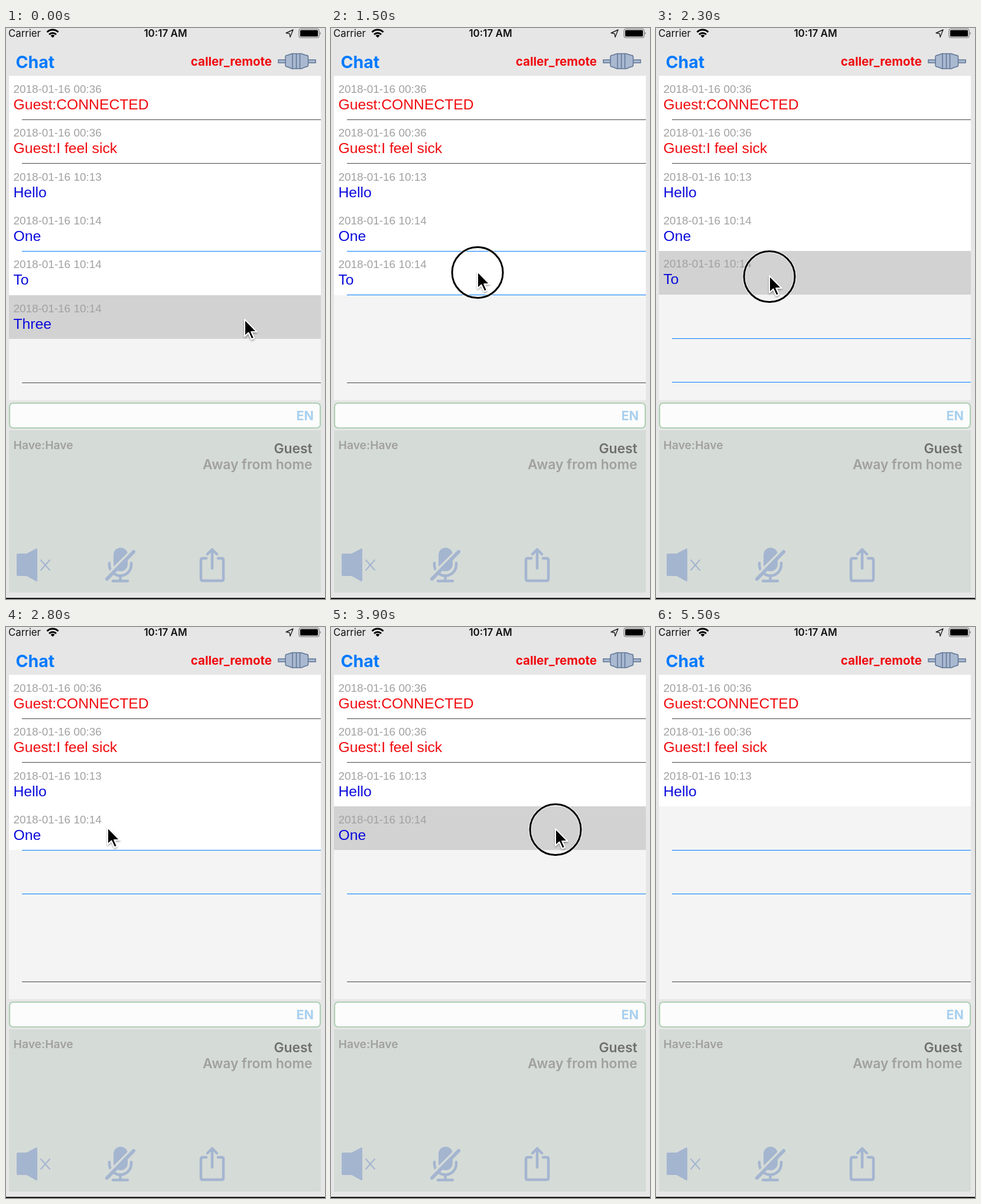
An HTML page for the animation above (5.6 s loop, 540x968 px).

```html
<!DOCTYPE html>
<html lang="en">
<head>
<meta charset="utf-8">
<title>Chat</title>
<style>
html, body { margin: 0; width: 100%; height: 100%; overflow: hidden; background: #e6e6e6; }
svg { display: block; width: 100%; height: 100%; }
text { font-family: Inter, Roboto, sans-serif; }
.date, .msg { font-family: "Liberation Sans", Arial, sans-serif; }
.date { font-size: 18.9px; fill: #a1a1a1; }
.msg { font-size: 24.7px; }
.b { font-weight: 700; }
.sb { font-weight: 600; }
.end { text-anchor: end; }
.icon { fill: #a4b5d0; }
.draw { fill: none; stroke: #a4b5d0; stroke-linecap: round; stroke-linejoin: round; }
</style>
</head>
<body>
<svg viewBox="0 0 540 968" preserveAspectRatio="none">
  <defs>
    <clipPath id="listClip"><rect x="5" y="81" width="528" height="550"/></clipPath>
    <filter id="soft" x="-50%" y="-50%" width="200%" height="200%">
      <feDropShadow dx="0" dy="2" stdDeviation="1.5" flood-opacity=".35"/>
    </filter>
  </defs>
  <rect width="540" height="968" fill="#e6e6e6"/>
  <rect y="966" width="540" height="2" fill="#151515"/>

  <!-- status bar -->
  <text x="4" y="15" font-size="16.8" fill="#111">Carrier</text>
  <g fill="none" stroke="#000" stroke-width="3">
    <path d="M69.5 7A13.5 13.5 0 0 1 88.500 7M73 11A8.600 8.600 0 0 1 85 11"/>
    <path d="M79 16.500L75.500 13A5 5 0 0 1 82.500 13Z" fill="#000" stroke="none"/>
  </g>
  <text class="sb" x="270" y="15" font-size="17" text-anchor="middle" fill="#111">10:17 AM</text>
  <path d="M486 3L474 8.500L480 9.500L481 15.500Z" fill="none" stroke="#222" stroke-width="1.4" stroke-linejoin="round"/>
  <rect x="496" y="1.500" width="34" height="15" rx="3.500" fill="none" stroke="#777" stroke-width="1.200"/>
  <rect x="498" y="3.500" width="30" height="11" rx="1.500"/>
  <path d="M531.500 6.500Q534 9 531.500 11.500Z" fill="#666"/>

  <!-- header -->
  <text class="b" x="16.500" y="68" font-size="28.500" fill="#007aff">Chat</text>
  <text class="b end" x="450" y="64" font-size="20.500" fill="#f00a0e">caller_remote</text>
  <g fill="#a9b9d0" stroke="#5f7595" stroke-width="1.500">
    <path d="M461 54H474V59H461ZM511 54H524V59H511Z"/>
    <path d="M473 49Q473 46 477 46L484 43.500H500L507 46Q511.500 46 511.500 49V63Q511.500 66 507 66L500 69H484L477 66Q473 66 473 63Z"/>
    <path d="M485 43.500V69M491.500 43.500V69M497.500 43.500V69" fill="none"/>
  </g>

  <g clip-path="url(#listClip)">
    <rect x="5" y="81" width="528" height="550" fill="#f4f4f4"/>
    <g id="rows"></g>
    <g id="lines"></g>
  </g>

  <!-- input and panel -->
  <rect x="6" y="636" width="526" height="42" rx="6" fill="#fcfcfc" stroke="#aed0b5" stroke-width="2.200"/>
  <text class="b end" x="521" y="665" font-size="21.500" fill="#a8d0ef">EN</text>
  <rect x="5" y="682" width="528" height="275" fill="#d5dbd7"/>
  <text class="sb" x="12.500" y="714" font-size="19.300" fill="#a0a0a0">Have:Have</text>
  <text class="sb end" x="518.500" y="720.500" font-size="22.800" fill="#6f6f6f">Guest</text>
  <text class="sb end" x="518.500" y="748" font-size="22.800" fill="#a0a0a0">Away from home</text>

  <path class="icon" d="M20 891H35L51 882.500Q53 881.500 53 884V936Q53 939 51 938L35 929H20Q18 929 18 927V893Q18 891 20 891Z"/>
  <path class="draw" d="M59 902L74 919M74 902L59 919" stroke-width="2"/>
  <rect class="icon" x="182" y="881" width="24" height="40" rx="12"/>
  <path class="draw" d="M175 907V910A18.500 18.500 0 0 0 212 910V907M193.500 929V937M181 937.500H206" stroke-width="4.500"/>
  <path d="M167 932L215 884" stroke="#d5dbd7" stroke-width="5"/>
  <path class="draw" d="M171 934L216 888" stroke-width="6"/>
  <path class="draw" d="M339 899H333Q330 899 330 902V934Q330 937 333 937H365Q368 937 368 934V902Q368 899 365 899H359M349 916V885M341 892L349 884L357 892" stroke-width="4.500"/>

  <g id="pointer">
    <g id="ring" fill="none">
      <circle cy="1.500" r="43" stroke="#fff" stroke-width="5" stroke-opacity=".75"/>
      <circle cy="1.500" r="43" stroke="#000" stroke-width="3"/>
    </g>
    <path d="M0 0V28.500L6.500 22.500L11.500 33.500L16 31.500L11.200 21H20.500Z" stroke="#fff" stroke-width="2" stroke-linejoin="round" filter="url(#soft)"/>
  </g>
</svg>
<script>
const LOOP = 5600, STEP = 100, ROW = 74.33, COLLAPSE = 300;
const DARK = '#464646', BLUE = '#007aff', RED = '#f00a0e', INK = '#0a0adc';
const $ = id => document.getElementById(id);

const messages = [
  ['00:36', 'Guest:CONNECTED', RED], ['00:36', 'Guest:I feel sick', RED],
  ['10:13', 'Hello', INK], ['10:14', 'One', INK], ['10:14', 'To', INK], ['10:14', 'Three', INK]
];
// row index, time it is picked, time its removal starts
const removals = [[5, 0, 513], [4, 1600, 2278], [3, 3850, 4380]];
const presses = [[100, 700], [1400, 1650], [2100, 2600], [3700, 4650]];
// time, x, y of the pointer tip
const path = [
  [0, 404, 494], [300, 400, 492], [500, 180, 489], [600, 6, 488], [700, 4, 486],
  [1300, 248, 413], [1700, 248, 413], [2100, 340, 423], [2300, 192, 420], [2450, 30, 414],
  [2550, 26, 410], [2800, 172, 340], [3000, 190, 340], [3600, 380, 342], [4200, 380, 342],
  [4450, 150, 340], [4600, 90, 338], [5000, 230, 310], [5400, 230, 310]
];
const POINTER_END = 5400;

function add(parent, tag, attrs, text) {
  const el = document.createElementNS('http://www.w3.org/2000/svg', tag);
  for (const k in attrs) el.setAttribute(k, attrs[k]);
  if (text) el.textContent = text;
  return parent.appendChild(el);
}

// Lower rows come first, so a collapsing row slides under the one above.
const rows = messages.map((m, i) => [m, i]).reverse().map(([[time, text, color], i]) => {
  const g = add($('rows'), 'g', {});
  const top = Math.round(81 + ROW * i), bottom = Math.round(81 + ROW * (i + 1));
  const y = Math.round(110 + ROW * i);
  const back = add(g, 'rect', { x: 5, y: top, width: 528, height: bottom - top });
  add(g, 'text', { class: 'date', x: 12.5, y }, '2018-01-16 ' + time);
  add(g, 'text', { class: 'msg', x: 12.5, y: y + 28, fill: color }, text);
  return { g, back };
}).reverse();

const lines = Array.from({ length: 8 }, (_, k) => ({
  el: add($('lines'), 'rect', { x: 27, width: 506, height: 1 }),
  y: Math.floor(155.4 + ROW * k)
}));

const show = (el, on) => el.setAttribute('display', on ? 'inline' : 'none');
const smooth = u => u * u * (3 - 2 * u);

function pointerAt(t) {
  const i = Math.max(1, path.findIndex(p => p[0] >= t));
  const [t0, x0, y0] = path[i - 1], [t1, x1, y1] = path[i];
  const u = (t - t0) / (t1 - t0);
  return [x0 + (x1 - x0) * u, y0 + (y1 - y0) * u];
}

function listAt(t) {
  let count = messages.length, picked = -1, shift = 0;
  for (const [row, pick, start] of removals) {
    if (t >= start + COLLAPSE) count = row;
    else if (t >= pick) {
      picked = row;
      shift = ROW * smooth(Math.max(0, t - start) / COLLAPSE);
    }
  }
  return { count, picked, shift: Math.round(shift) };
}

function render(t) {
  const { count, picked, shift } = listAt(t);
  rows.forEach(({ g, back }, i) => {
    show(g, i < count);
    back.setAttribute('fill', i === picked ? '#d2d2d2' : '#fff');
    g.setAttribute('transform', `translate(0 ${i === picked ? -shift : 0})`);
  });

  const moving = shift > 0;
  lines.forEach(({ el, y }, k) => {
    const beside = picked >= 0 && (k === picked || k === picked - 1);
    const spare = k === 5 || k === 7;
    show(el, k !== 2 && !beside && (!spare || moving));
    el.setAttribute('y', picked >= 0 && k > picked ? y - shift : y);
    const dark = k < 2 || (k > 5 && !(moving && picked < 5));
    el.setAttribute('fill', dark ? DARK : BLUE);
  });

  const visible = t < POINTER_END;
  show($('pointer'), visible);
  if (visible) {
    const [x, y] = pointerAt(t);
    $('pointer').setAttribute('transform', `translate(${x} ${y})`);
    show($('ring'), presses.some(([a, b]) => t >= a && t < b));
  }
}

const origin = performance.now();
function tick() {
  const t = (performance.now() - origin) % LOOP;
  render(Math.floor(t / STEP) * STEP);
  requestAnimationFrame(tick);
}
tick();
</script>
</body>
</html>
```
